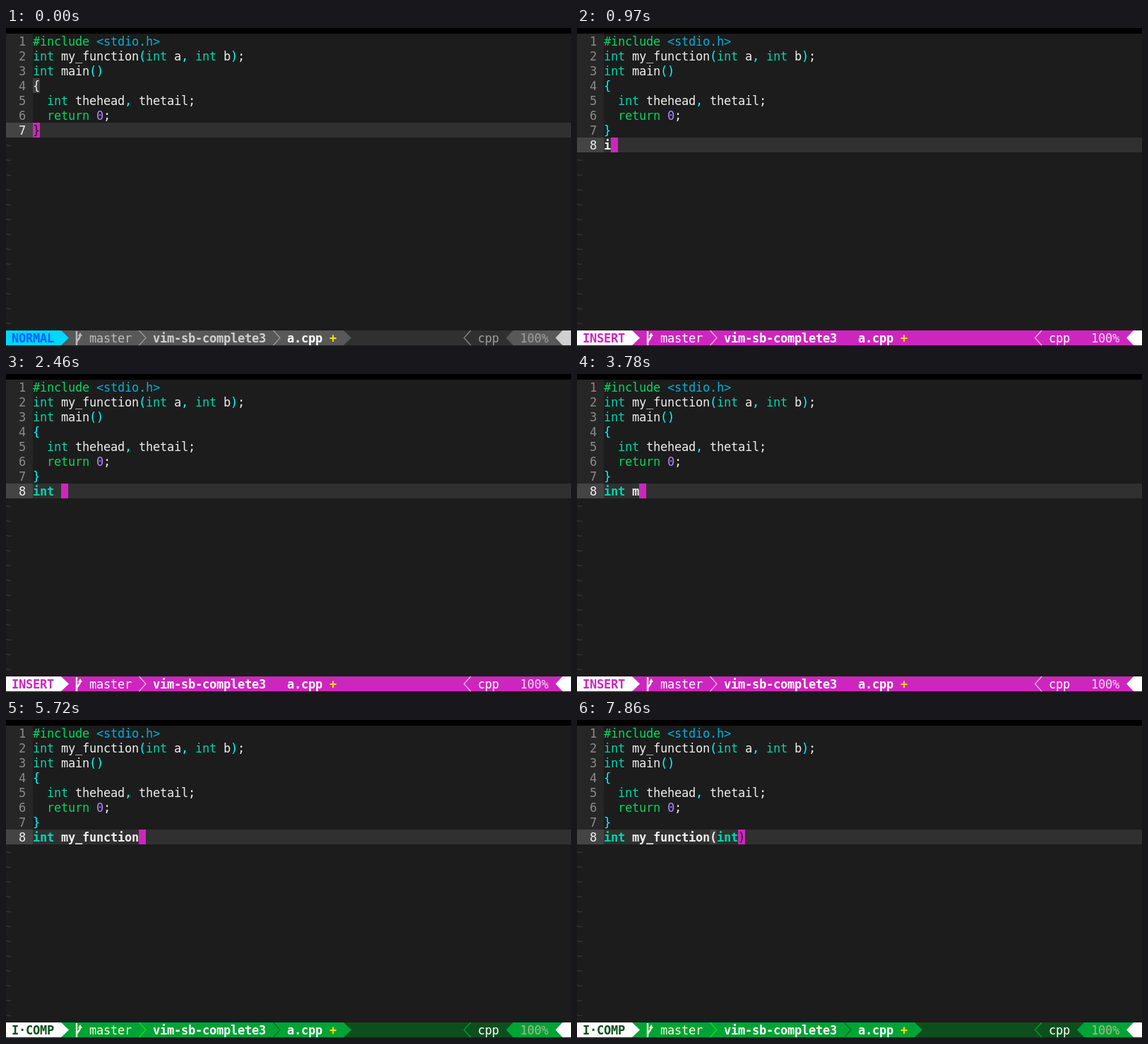
Recreate the animation shown at these times as an HTML page with a canvas. Size 800 by 450 pixels, loop 8 s.

```html
<!DOCTYPE html>
<html lang="en">
<head>
<meta charset="utf-8">
<title>Editor completion</title>
<style>
html, body { margin: 0; width: 100%; height: 100%; overflow: hidden; background: #1c1c1c; }
canvas { display: block; }
</style>
</head>
<body>
<canvas id="stage" width="800" height="450"></canvas>
<script>
const ctx = document.getElementById('stage').getContext('2d');
const LOOP = 8000, CELL = 10, ROW = 21, BASELINE = 17, TOP = 8, TEXT_X = 38, BAR_Y = 428;
const FONT = "17px 'DejaVu Sans Mono', monospace";
const MAGENTA = '#cd26be', FG = '#eeeeee', MATCH = '#3e3e3e';

const code = [
  '#include <stdio.h>',
  'int my_function(int a, int b);',
  'int main()',
  '{',
  '  int thehead, thetail;',
  '  return 0;',
  '}'
];

const syntax = [
  [/^(#include|return)$/, '#00d75f'],
  [/^</, '#00afd7'],
  [/^int$/, '#00d7af'],
  [/^\d$/, '#af87ff'],
  [/^[(){},]$/, '#00ffff']
];
const tokens = /(#include|return|<[\w.]+>|\bint\b|\b\d\b|[(){},])/;

const modes = {
  normal: {
    label: 'NORMAL', head: '#00d7ff', ink: '#005fff', main: '#585858', fill: '#303030',
    branch: '#bcbcbc', dir: '#d0d0d0', file: '#ffffff', type: '#9e9e9e', percent: '#9e9e9e',
    sep1: '#9e9e9e', sep2: '#9e9e9e', sep3: '#8a8a8a', tail: '#d0d0d0'
  },
  insert: {
    label: 'INSERT', head: '#ffffff', ink: MAGENTA, main: MAGENTA, fill: MAGENTA,
    branch: '#ffffff', dir: '#ffffff', file: '#ffffff', type: '#ffffff', percent: '#f6d5f3',
    sep1: '#f0b8ea', sep2: MAGENTA, sep3: '#f0b8ea', tail: '#ffffff'
  },
  comp: {
    label: 'I·COMP', head: '#ffffff', ink: '#0b4f1c', main: '#00a335', fill: '#0d4f1c',
    branch: '#f8ffd8', dir: '#ffffff', file: '#ffffff', type: '#ffffff', percent: '#a8b890',
    sep1: '#00e820', sep2: '#0b6a24', sep3: '#00a335', tail: '#ffffff'
  }
};

// time, typed line (null before it exists), cursor column, mode, bracket match shown
const steps = [
  [0, null, 0, 'normal', true],
  [180, '', 0, 'normal'],
  [230, '', 0, 'insert'],
  [970, 'i', 1, 'insert'],
  [1150, 'in', 2, 'insert'],
  [1450, 'i', 1, 'insert'],
  [1810, 'int', 3, 'insert'],
  [1850, 'int', 3, 'comp'],
  [2460, 'int ', 4, 'insert'],
  [3780, 'int m', 5, 'insert'],
  [4590, 'int mf', 6, 'insert'],
  [4780, 'int mfu', 7, 'insert'],
  [5090, 'int mfu', 6, 'insert'],
  [5260, 'int mfu', 5, 'insert'],
  [5670, 'int my_function', 15, 'insert'],
  [5720, 'int my_function', 15, 'comp'],
  [6810, 'int my_function(', 16, 'insert'],
  [6860, 'int my_function()', 16, 'insert', true],
  [7070, 'int my_function(i)', 17, 'insert'],
  [7110, 'int my_function(i)', 17, 'insert', true],
  [7640, 'int my_function(in)', 18, 'insert'],
  [7680, 'int my_function(in)', 18, 'insert', true],
  [7820, 'int my_function(int)', 19, 'insert'],
  [7860, 'int my_function(int)', 19, 'comp', true]
];

const rowY = row => TOP + row * ROW;

function rect(x, y, w, h, color) {
  ctx.fillStyle = color;
  ctx.fillRect(x, y, w, h);
}

// Terminal text: one glyph per cell.
function text(str, x, y, color, bold) {
  ctx.font = (bold ? 'bold ' : '') + FONT;
  ctx.fillStyle = color;
  [...str].forEach((ch, i) => ctx.fillText(ch, x + i * CELL, y + BASELINE));
}

function codeLine(str, row, bold) {
  let x = TEXT_X;
  for (const part of str.split(tokens)) {
    const rule = syntax.find(([pattern]) => pattern.test(part));
    text(part, x, rowY(row), rule ? rule[1] : FG, bold);
    x += part.length * CELL;
  }
}

function cell(ch, col, row, bg, ink, bold) {
  const x = TEXT_X + col * CELL;
  rect(x, rowY(row), CELL, ROW, bg);
  text(ch, x, rowY(row), ink, bold);
}

// Chevron from x to tip, filled or as a thin line.
function chevron(x, tip, color, filled) {
  ctx.beginPath();
  ctx.moveTo(x, BAR_Y);
  ctx.lineTo(tip, BAR_Y + ROW / 2);
  ctx.lineTo(x, BAR_Y + ROW);
  ctx.fillStyle = ctx.strokeStyle = color;
  ctx.lineWidth = 1.2;
  filled ? ctx.fill() : ctx.stroke();
}

function branchIcon(color) {
  ctx.strokeStyle = ctx.fillStyle = color;
  ctx.lineWidth = 2.4;
  ctx.beginPath();
  ctx.moveTo(100, 429);
  ctx.lineTo(100, 449);
  ctx.moveTo(100, 446);
  ctx.bezierCurveTo(100, 440, 105, 442, 105, 434);
  ctx.stroke();
  ctx.beginPath();
  ctx.moveTo(102, 436);
  ctx.lineTo(105, 431);
  ctx.lineTo(108, 436);
  ctx.fill();
}

function statusBar(m) {
  const label = (str, x, color, bold) => text(str, x, BAR_Y, color, bold);
  rect(0, BAR_Y, 800, ROW, m.fill);
  rect(78, BAR_Y, 400, ROW, m.main);
  chevron(478, 489, m.main, true);
  rect(0, BAR_Y, 78, ROW, m.head);
  chevron(78, 89, m.head, true);
  rect(718, BAR_Y, 70, ROW, m.main);
  chevron(718, 708, m.main, true);
  rect(788, BAR_Y, 12, ROW, m.tail);
  chevron(788, 778, m.tail, true);
  chevron(188.5, 198, m.sep1);
  chevron(378.5, 388, m.sep2);
  chevron(658, 648.5, m.sep3);
  branchIcon(m.branch);
  label(m.label, 8, m.ink, true);
  label('master', 118, m.branch);
  label('vim-sb-complete3', 208, m.dir, true);
  label('a.cpp', 398, m.file, true);
  label('+', 458, '#ffdf00', true);
  label('cpp', 668, m.type);
  label('100%', 728, m.percent);
}

function draw(time) {
  const [, typed, col, mode, match] = steps.findLast(s => s[0] <= time);
  const lines = typed === null ? code : [...code, typed];
  const last = lines.length - 1, line = lines[last];

  rect(0, 0, 800, 450, '#1c1c1c');
  rect(0, 0, 800, TOP, '#000000');
  rect(0, TOP, TEXT_X, last * ROW, '#262626');
  rect(0, rowY(last), 800, ROW, '#303030');
  rect(0, rowY(last), TEXT_X, ROW, '#444444');

  lines.forEach((str, row) => {
    text(String(row + 1), 18, rowY(row), row === last ? FG : '#8a8a8a');
    codeLine(str, row, row === last);
  });
  for (let row = lines.length; row < 20; row++) text('~', -2, rowY(row), '#343434');

  if (match && typed === null) cell('{', 0, 3, MATCH, FG);
  else if (match) cell('(', line.indexOf('('), last, MATCH, FG, true);
  cell(line[col] || ' ', col, last, MAGENTA, '#1c1c1c');
  statusBar(modes[mode]);
}

const start = performance.now();
function tick() {
  draw((performance.now() - start) % LOOP);
  requestAnimationFrame(tick);
}
tick();
</script>
</body>
</html>
```
